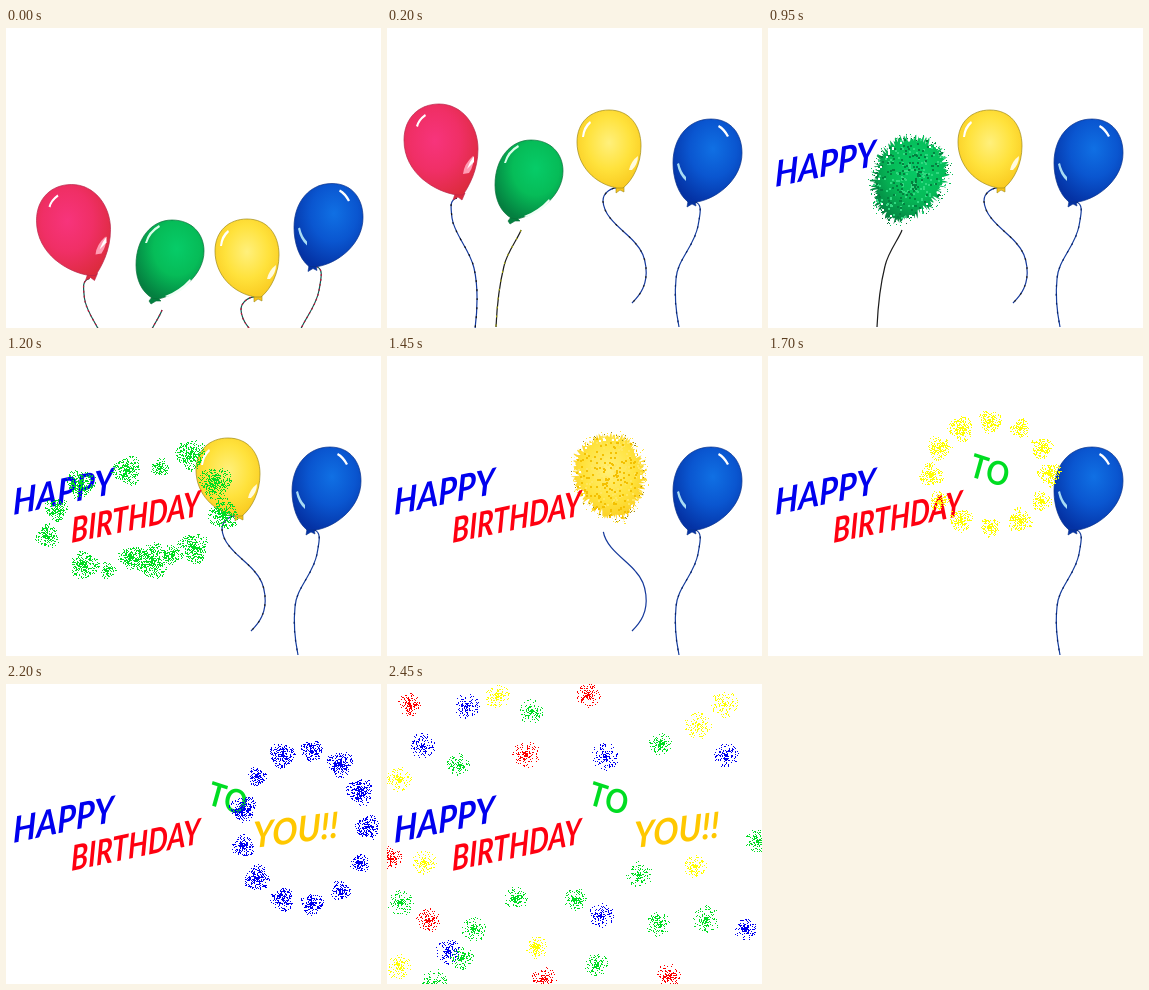
Write an HTML page that moves like this. It is 375 by 300 pixels and loops after 3450 ms.

```html
<!DOCTYPE html>
<html lang="en">
<head>
<meta charset="utf-8">
<title>Happy Birthday</title>
<style>
  html, body { margin: 0; width: 100%; height: 100%; overflow: hidden; background: #fff; }
  svg { display: block; width: 375px; height: 300px; }
  text { font-family: Lato, "Open Sans", sans-serif; font-weight: 700; font-style: italic; }
</style>
</head>
<body>
<svg id="stage" viewBox="0 0 375 300"></svg>
<script>
const NS = 'http://www.w3.org/2000/svg';
const stage = document.getElementById('stage');
const LOOP = 3450;
const STEPS = [0, 200, 450, 700, 950, 1200, 1450, 1700, 1950, 2200, 2450];

const RED = '#ff0000', GREEN = '#00dd22', YELLOW = '#ffff00', BLUE = '#0000f0';

let seed = 7;
function rand() {
  seed = (seed + 0x6D2B79F5) | 0;
  let v = Math.imul(seed ^ (seed >>> 15), 1 | seed);
  v = (v + Math.imul(v ^ (v >>> 7), 61 | v)) ^ v;
  return ((v ^ (v >>> 14)) >>> 0) / 4294967296;
}

function add(parent, tag, attrs = {}) {
  const node = document.createElementNS(NS, tag);
  for (const key in attrs) node.setAttribute(key, attrs[key]);
  parent.appendChild(node);
  return node;
}

const show = (node, on) => node.setAttribute('display', on ? 'inline' : 'none');
const dot = (x, y, s = 1) => `M${Math.round(x)} ${Math.round(y)}h${s}v${s}h${-s}z`;

function dots(parent, fill, d) {
  return add(parent, 'path', { d, fill, 'shape-rendering': 'crispEdges' });
}

// Round spray of single pixels, densest in the middle
function spray(x, y, r, count, power, lobe) {
  const phase = rand() * 6.28;
  let d = '';
  for (let i = 0; i < count; i++) {
    const a = rand() * Math.PI * 2;
    const q = r * Math.pow(rand(), power) * (1 - lobe + lobe * Math.cos(3 * a + phase));
    d += dot(x + q * Math.cos(a), y + q * Math.sin(a));
  }
  return d;
}

const balloonSpecs = [
  {
    body: 'M70 167C49 164 17 146 17 112C17 90 32 76 52 76C75 76 91 97 91 121C91 142 82 158 76 167Z',
    knot: 'M68 166L78 165L75 172L71 169L66 172Z',
    string: 'M70 170C62 172 64 180 65 190C67 206 83 222 87 240C92 262 90 285 88 301',
    start: [13.5, 80.5], hidden: 10,
    tones: ['#f7347c', '#f02f66', '#dc2b3c'], focus: [0.42, 0.4], edge: '#b82348',
    glints: [['M29 98Q31 91 38 86L39 88Q32 93 31 99Z', '#fff'],
             ['M76 146Q77 136 86 128Q88 136 82 145Z', '#ff9cb4'],
             ['M80 141Q83 133 87 128L87 134Z', '#fff']],
    threads: ['#12389c', '#111'], flecks: ['#f7588c', '#c81f3e']
  },
  {
    body: 'M124 190C114 184 108 172 108 157C108 130 124 112 144 112C164 112 176 126 176 143C176 168 150 187 130 191Z',
    knot: 'M124 189L130 190L133 193L128 193L123 196L121 193Z',
    string: 'M134 202C132 209 120 224 117 238C112 258 110 277 109 299',
    start: [22, 80], hidden: 0,
    tones: ['#06cc68', '#06bc58', '#048040'], focus: [0.6, 0.36], edge: '#087038',
    glints: [['M117 135Q120 123 131 117L132 119Q122 125 119 135Z', '#d8ffe8'],
             ['M137 188Q151 183 162 171L163 173Q154 185 139 189Z', '#f0fff6']],
    threads: ['#1c1c1c', '#a0a010'], flecks: ['#30d880', '#048040']
  },
  {
    body: 'M230 160C208 156 190 138 190 114C190 94 204 82 222 82C242 82 254 97 254 118C254 136 246 152 236 160Z',
    knot: 'M229 159L237 159L237 164L233 162L229 165Z',
    string: 'M236 160C224 158 216 165 216 173C217 192 240 204 249 216C261 229 261 249 256 260C253 267 249 271 245 275',
    start: [19, 109], hidden: 30,
    tones: ['#fff07c', '#ffe23c', '#f8c418'], focus: [0.5, 0.42], edge: '#a08a18',
    glints: [['M195 109Q196 98 203 93L204 95Q198 101 197 109Z', '#fff'],
             ['M242 142Q244 133 251 128Q251 136 245 142Z', '#fffbe0']],
    threads: ['#14389a', '#222'], flecks: ['#ffe660', '#f4c000']
  },
  {
    body: 'M301 174C291 166 286 150 286 135C286 109 302 91 324 91C344 91 355 106 355 125C355 150 332 170 310 174Z',
    knot: 'M301 173L308 173L309 178L305 176L300 179Z',
    string: 'M308 174C316 176 313 186 311 198C307 219 290 232 289 251C287 270 289 284 292 299',
    start: [2, 64.5], hidden: 11,
    tones: ['#1070e4', '#0a56d0', '#0432a4'], focus: [0.58, 0.36], edge: '#06308c',
    glints: [['M332 97Q338 100 342 108L340 109Q336 102 331 99Z', '#fff'],
             ['M290 136Q292 147 299 153L299 149Q294 144 292 135Z', '#a8dcf4']],
    threads: ['#143c9c', '#0a2468'], flecks: ['#2c84e8', '#0638a8']
  }
];

const defs = add(stage, 'defs');

// Ragged outline with loose specks, for the moment of popping
function makeBurst(parent, body, spec, fill) {
  const g = add(parent, 'g');
  const box = body.getBBox();
  const cx = box.x + box.width / 2, cy = box.y + box.height / 2;
  const len = body.getTotalLength(), count = 260;
  const rim = (u, push) => {
    const p = body.getPointAtLength(len * u);
    const dx = p.x - cx, dy = p.y - cy, k = 1 + push / Math.hypot(dx, dy);
    return [cx + dx * k, cy + dy * k];
  };
  const points = [];
  for (let i = 0; i < count; i++) points.push(rim(i / count, rand() * 9 - 2).join());
  add(g, 'polygon', { points: points.join(' '), fill });

  const scatter = (color, n, lo, hi, size) => {
    let d = '';
    for (let i = 0; i < n; i++) d += dot(...rim(rand(), lo + rand() * (hi - lo)), size);
    dots(g, color, d);
  };
  spec.flecks.forEach(color => scatter(color, 150, -30, 3, 2));
  scatter(spec.tones[1], 70, 3, 8, 1);
  scatter('#fff', 45, -2, 5, 2);
  scatter(spec.edge, 45, 0, 7, 1);
  return g;
}

function makeBalloon(spec, i) {
  const g = add(stage, 'g');
  const [fx, fy] = spec.focus;
  const grad = add(defs, 'radialGradient', { id: 'tone' + i, cx: fx, cy: fy, r: 0.68 });
  spec.tones.forEach((c, n) => add(grad, 'stop', { offset: [0, 0.5, 1][n], 'stop-color': c }));
  const fill = `url(#tone${i})`;

  const thread = () => add(g, 'path', { d: spec.string, fill: 'none', 'stroke-width': 1.2 });
  const threads = [thread(), thread()];
  const whole = add(g, 'g');
  add(whole, 'path', { d: spec.knot, fill: spec.tones[2], stroke: spec.edge, 'stroke-width': 0.6 });
  const body = add(whole, 'path', { d: spec.body, fill, stroke: spec.edge, 'stroke-width': 0.7 });
  for (const [d, color] of spec.glints) add(whole, 'path', { d, fill: color });
  const burst = makeBurst(g, body, spec, fill);

  return step => {
    const pop = 2 + 2 * i, low = step === 0, popping = step === pop;
    show(g, step <= pop);
    show(whole, step < pop);
    show(burst, popping);
    g.setAttribute('transform', low ? `translate(${spec.start})` : '');
    const colors = low ? ['#0c5a50', '#c0143c'] : spec.threads;
    threads.forEach((t, n) => t.setAttribute('stroke', colors[n]));
    threads[0].setAttribute('stroke-dasharray', popping ? `0 ${spec.hidden} 400` : 'none');
    threads[1].setAttribute('stroke-dasharray', low ? '2 3' : '2 7');
    show(threads[1], !popping);
  };
}

function makeWord(label, fill, size, transform) {
  const node = add(stage, 'text', { fill, 'font-size': size, transform });
  node.textContent = label;
  return node;
}

const balloons = balloonSpecs.map(makeBalloon);

const words = [
  makeWord('HAPPY', '#0000ee', 36, 'translate(7 159) skewY(-12) scale(.9 1)'),
  makeWord('BIRTHDAY', '#ff0010', 35, 'translate(65 187) skewY(-12) scale(.8 1)'),
  makeWord('TO', '#00dd22', 33, 'translate(201 120) rotate(9) skewY(9) scale(.92 1)'),
  makeWord('YOU!!', '#ffc800', 36, 'translate(247 164) skewY(-7) scale(.93 1)')
];

// Sprays around each word: x, y, radius
const redSpots = [
  [10, 108, 11], [41, 79, 13], [74, 72, 15], [124, 83, 14], [134, 105, 12], [122, 148, 10],
  [133, 138, 9], [42, 174, 13], [67, 198, 14], [72, 163, 10], [85, 157, 13], [6, 182, 11]
];
const greenSpots = [
  [74, 127, 16], [121, 114, 16], [154, 111, 10], [184, 98, 17], [50, 153, 13], [41, 180, 13],
  [78, 209, 16], [101, 214, 9], [124, 201, 13], [145, 204, 20], [166, 198, 11], [187, 191, 17],
  [209, 126, 18], [217, 158, 17]
];

function ring(cx, cy, rx, ry, n) {
  return Array.from({ length: n }, (_, i) => {
    const a = i / n * Math.PI * 2;
    return [cx + rx * Math.cos(a), cy + ry * Math.sin(a), 10 + rand() * 5];
  });
}

function makeSplash(color, spots, lobe) {
  const d = spots.map(([x, y, r]) => spray(x, y, r, r * r * 1.3, 0.8, lobe)).join('');
  return dots(stage, color, d);
}

const splashes = [
  makeSplash(RED, redSpots, 0.35),
  makeSplash(GREEN, greenSpots, 0.12),
  makeSplash(YELLOW, ring(222, 118, 59, 53, 12), 0.12),
  makeSplash(BLUE, ring(298, 143, 63, 77, 13), 0.12)
];

const confetti = add(stage, 'g');
const confettiSpots = [
  [RED, [[22, 20], [201, 11], [139, 70], [41, 236], [3, 173], [157, 296], [281, 291]]],
  [BLUE, [[79, 22], [35, 61], [218, 72], [339, 71], [214, 231], [358, 245], [61, 267]]],
  [GREEN, [[144, 27], [71, 80], [273, 60], [252, 190], [129, 214], [188, 215], [13, 219],
    [86, 245], [75, 274], [271, 240], [319, 235], [209, 280], [370, 156], [47, 298]]],
  [YELLOW, [[110, 12], [337, 20], [311, 41], [12, 95], [37, 178], [308, 182], [149, 263], [11, 282]]]
];
for (const [color, spots] of confettiSpots) {
  dots(confetti, color, spots.map(([x, y]) => spray(x, y, 11 + rand() * 3, 150, 1, 0)).join(''));
}

let current = -1;
function render(time) {
  const t = time % LOOP;
  const step = STEPS.filter(s => s <= t).length - 1;
  if (step === current) return;
  current = step;
  balloons.forEach(update => update(step));
  words.forEach((word, i) => show(word, step >= 3 + 2 * i));
  splashes.forEach((splash, i) => show(splash, step === 3 + 2 * i));
  show(confetti, step === 10);
}

const begin = performance.now();
function tick() {
  render(performance.now() - begin);
  requestAnimationFrame(tick);
}
tick();
</script>
</body>
</html>
```
